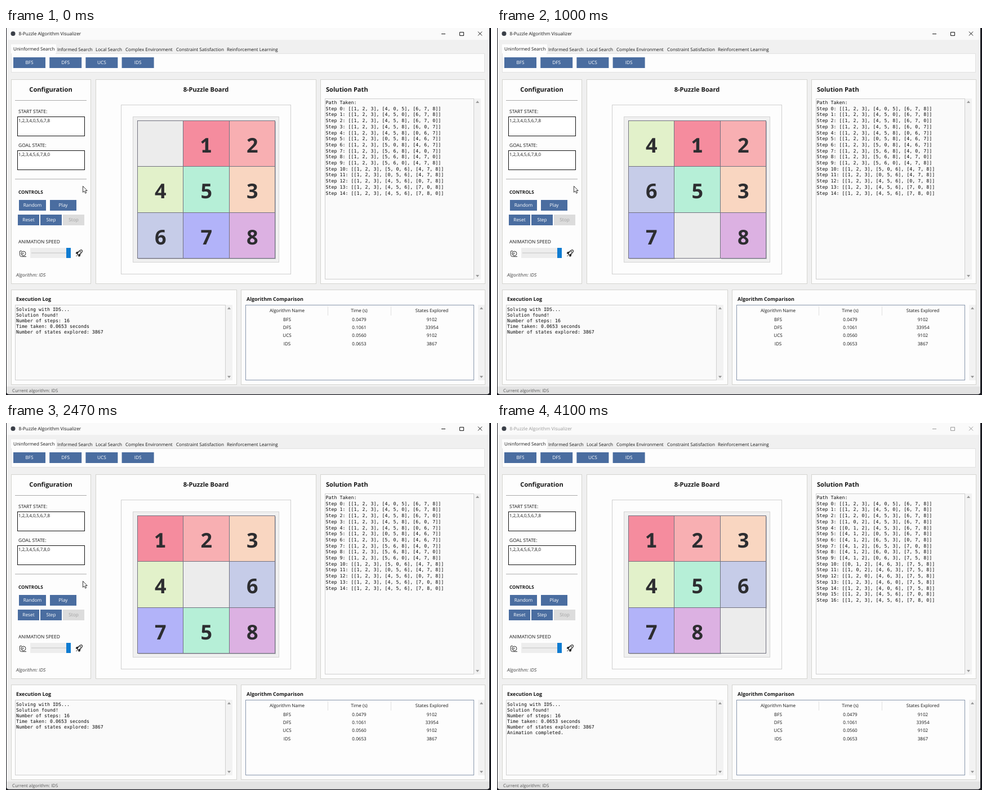
An HTML page for the animation above (4130 ms loop, 861 px wide and 651 px high).

```html
<!DOCTYPE html>
<html lang="en">
<head>
<meta charset="utf-8">
<title>8-Puzzle Algorithm Visualizer</title>
<style>
html, body { margin: 0; width: 100%; height: 100%; overflow: hidden; background: #1b1c22; }
svg { display: block; }
text { font-family: "Open Sans", "Noto Sans", sans-serif; text-rendering: geometricPrecision; }
.mono { font-family: "DejaVu Sans Mono", monospace; }
.b { font-weight: 700; }
.i { font-style: italic; }
</style>
</head>
<body>
<svg id="stage" width="861" height="651" viewBox="0 0 861 651"></svg>
<script>
const LOOP = 4130;
const START = [1, 2, 3, 4, 0, 5, 6, 7, 8];
const TILE = ['#ececec', '#f58c9e', '#f8afb2', '#f9d6c1', '#e2f1ca', '#b6efd7', '#c6cce8', '#b2b3f9', '#dcb1e2'];
const FIRST_STEP = 4;
const STEP_TIMES = [330, 610, 820, 1030, 1225, 1420, 1620, 1820, 2050, 2260, 2480, 2690];
const DONE = 2900, CURSOR_MOVE = 3360, CURSOR_GONE = 3900, BLUR = 3960;
const INK = '#161616', PAPER = '#fdfdfd', FIELD = '#fafafa';

// Rectangles are given by their corners, texts by their vertical middle.
const box = (x1, y1, x2, y2, fill, stroke = 'none') => {
  const o = stroke === 'none' ? 0 : .5;
  return `<rect x="${x1 + o}" y="${y1 + o}" width="${x2 - x1 - 2 * o}" height="${y2 - y1 - 2 * o}" fill="${fill}" stroke="${stroke}"/>`;
};
const text = (s, x, y, size = 8.1, fill = INK, cls = '', anchor = 'start') =>
  `<text x="${x}" y="${y + size * .357}" font-size="${size}" fill="${fill}" class="${cls}" text-anchor="${anchor}">${s}</text>`;
const mid = (s, x, y, size, fill, cls) => text(s, x, y, size, fill, cls, 'middle');
const path = (d, stroke = '#222', fill = 'none', w = 1) =>
  `<path d="${d}" stroke="${stroke}" fill="${fill}" stroke-width="${w}"/>`;
const mono = (lines, x, y, gap) =>
  lines.map((s, i) => text(s, x, y + i * gap, 8.305, '#0a0a0a', 'mono')).join('');
const button = (s, x1, y1, x2, y2, off) =>
  box(x1, y1, x2, y2, off ? '#dcdcdc' : '#4a6da0') +
  mid(s, (x1 + x2) / 2, (y1 + y2) / 2, 8.3, off ? '#a2a2a2' : '#fff');
const panel = (x1, y1, x2, y2) => box(x1, y1, x2, y2, PAPER, '#d4d4d0');
const scrollbar = (x, y1, y2) => box(x - 6, y1, x + 6, y2, '#f2f2f2') +
  path(`M${x - 3} ${y1 + 8}l3-4 3 4zM${x - 3} ${y2 - 8}l3 4 3-4z`, 'none', '#999');

// Follow the blank square from cell to cell.
function solve(cells) {
  const states = [START];
  for (let i = 1; i < cells.length; i++) {
    const s = [...states[i - 1]];
    s[cells[i - 1]] = s[cells[i]];
    s[cells[i]] = 0;
    states.push(s);
  }
  return states;
}
const row = (s, r) => `[${s.slice(r * 3, r * 3 + 3).join(', ')}]`;
const listing = states => mono(['Path Taken:', ...states.map((s, i) =>
  `Step ${i}: [${[0, 1, 2].map(r => row(s, r)).join(', ')}]`)], 567.5, 132, 10.71);

const oldPath = solve('458763478543678');
const states = solve('45210367430125478');

function board(state) {
  const at = i => Math.round(i * 81.4);
  let shadows = '', tiles = '';
  state.forEach((n, i) => {
    const c = i % 3, r = Math.floor(i / 3);
    const x1 = 233 + at(c), x2 = 234 + at(c + 1), y1 = 164 + at(r), y2 = 165 + at(r + 1);
    const cx = (x1 + x2) / 2 + .3, cy = y1 + 44;
    if (n) shadows += box(x1 + 2, y1 + 2, x2 + 1, y2 + 1, '#b9b9bf');
    tiles += box(x1, y1, x2, y2, TILE[n], '#71717f');
    if (n) tiles += mid(n, n === 1 ? cx - 1.2 : cx, cy, 36, '#2d2d30', 'b');
    if (n === 1) tiles += box(cx - 7, cy + 8.4, cx + 8, cy + 12.9, '#2d2d30');
  });
  return shadows + tiles;
}

const titleBar =
  '<circle cx="12.5" cy="10" r="4" fill="#3a3f48"/>' +
  `<g id="title">${text('8-Puzzle Algorithm Visualizer', 22.5, 10.5, 8.25, 'currentColor')}` +
  path('M773 10.5h7M805.5 7.5h7v6h-7zM838 6.5l7 7m0-7l-7 7', 'currentColor') + '</g>';

const tabs = box(9, 29, 89, 47, PAPER) + box(9, 45, 850, 79, PAPER, '#e2e2e2') +
  box(10, 44, 88, 47, PAPER) +
  text('Uninformed Search', 13, 37) +
  [['Informed Search', 91], ['Local Search', 159], ['Complex Environment', 212],
   ['Constraint Satisfaction', 302], ['Reinforcement Learning', 392]]
    .map(([s, x]) => text(s, x, 38.5)).join('') +
  ['BFS', 'DFS', 'UCS', 'IDS'].map((s, i) => button(s, 13 + i * 64.2, 52, 70 + i * 64.2, 71)).join('');

const snail = path('M24.500 395.500v7q0 3 3 3h8.500M25 395.500h3M31.500 400.500a1.300 1.300 0 1 0-1.500 1.200', '#333') +
  '<circle cx="31" cy="400" r="4" fill="none" stroke="#333"/>';
const rocket = '<ellipse cx="131" cy="398" rx="5.500" ry="2.500" transform="rotate(-45 131 398)" fill="#fff" stroke="#222" stroke-width="1.200"/>' +
  path('M129 397l-4 .5-1 2.500 3 .5zM132 400.500l-.5 4-2.500 1-.5-3z', '#222', '#222', .6) +
  path('M127 402.500l-2.500 2.500') + '<circle cx="132" cy="397" r="1" fill="#222"/>';

const config = panel(9, 91, 151, 454) + mid('Configuration', 79.5, 109, 11.1, INK, 'b') +
  path('M16 128.500h127M16 268h127', '#aaa') +
  text('START STATE:', 22, 148, 8.45) + box(20, 157, 140, 192, '#fff', '#111') +
  text('1,2,3,4,0,5,6,7,8', 22, 164.5, 7.9) +
  text('GOAL STATE:', 22, 208, 8.45) + box(20, 217, 140, 252, '#fff', '#111') +
  text('1,2,3,4,5,6,7,8,0', 22, 224.5, 7.9) +
  text('CONTROLS', 22, 291, 8.15, INK, 'b') +
  button('Random', 23, 305, 71, 324) + button('Play', 78, 305, 125, 324) +
  button('Reset', 21, 331, 59, 350) + button('Step', 61, 331, 99, 350) +
  button('Stop', 101, 331, 139, 350, true) +
  text('ANIMATION SPEED', 22, 379, 8.45) +
  box(43, 390, 115, 408, '#ededed') + box(45, 398, 107, 400, '#d8d8d8') +
  box(107, 390, 115, 408, '#0f7cd1') + snail + rocket +
  text('Algorithm: IDS', 18, 438.5, 8.4, '#444', 'i');

const boardPanel = panel(159, 91, 551, 454) + mid('8-Puzzle Board', 355, 109, 11.1, INK, 'b') +
  box(204, 136, 506, 437, PAPER, '#cfcfcf') + box(225, 157, 485, 416, '#f0f0f0', '#d3d3d3') +
  '<g id="board"></g>';

const pathPanel = panel(558, 91, 851, 454) + text('Solution Path', 568, 109, 11.1, INK, 'b') +
  box(566, 125, 831, 446, FIELD, '#cfcfcf') + scrollbar(837, 125, 446) +
  `<g id="oldPath">${listing(oldPath)}</g><g id="newPath">${listing(states)}</g>`;

const log = panel(9, 464, 410, 633) + text('Execution Log', 18, 481, 9, INK, 'b') +
  box(16, 491, 390, 625, FIELD, '#cfcfcf') + scrollbar(396, 491, 625) +
  mono(['Solving with IDS...', 'Solution found!', 'Number of steps: 16',
    'Time taken: 0.0653 seconds', 'Number of states explored: 3867'], 18, 499, 10) +
  `<g id="done">${mono(['Animation completed.'], 18, 549, 10)}</g>`;

const cells = (values, y) => [499, 627, 756].map((x, i) => mid(values[i], x, y)).join('');
const table = panel(417, 464, 851, 633) + text('Algorithm Comparison', 427, 481, 8.95, INK, 'b') +
  box(425, 491, 831, 625, PAPER, '#8796ac') + scrollbar(844, 491, 625) +
  path('M571.500 493v17M683.500 493v17', '#e0e0e0') +
  cells(['Algorithm Name', 'Time (s)', 'States Explored'], 501) +
  [['BFS', '0.0479', 9102], ['DFS', '0.1061', 33954], ['UCS', '0.0560', 9102], ['IDS', '0.0653', 3867]]
    .map((r, i) => cells(r, 517 + i * 14.25)).join('');

const status = path('M1 636H858V645q0 4.500-4.500 4.500H5.500q-4.500 0-4.500-4.500z', 'none', '#e3e3e3') +
  text('Current algorithm: IDS', 11, 643.5, 7.8, '#555');

const stage = document.getElementById('stage');
stage.innerHTML =
  path('M1 0H858V645q0 4.500-4.500 4.500H5.500q-4.500 0-4.500-4.500z', 'none', '#f0f0f0') +
  box(1, 0, 858, 21, '#fafafa') + titleBar + tabs + config + boardPanel + pathPanel + log + table + status +
  `<g id="cursor">${path('M.5.5v11l2.500-2.300 1.800 4 1.900-.9-1.800-3.800h3.300z', '#222', '#fff', .9)}</g>`;

const el = id => document.getElementById(id);
const show = (id, on) => el(id).setAttribute('visibility', on ? 'visible' : 'hidden');
let shown = -1;

function draw(t) {
  const step = FIRST_STEP + STEP_TIMES.filter(s => t >= s).length;
  if (step !== shown) el('board').innerHTML = board(states[shown = step]);
  show('oldPath', t < DONE);
  show('newPath', t >= DONE);
  show('done', t >= DONE);
  show('cursor', t < CURSOR_GONE);
  const k = Math.max(0, Math.min(1, (t - CURSOR_MOVE) / 100));
  el('cursor').setAttribute('transform', `translate(${136 + 24.5 * k} ${280 - 6.5 * k})`);
  el('title').style.color = t < BLUR ? INK : '#999';
}

const begin = performance.now();
function tick() {
  draw((performance.now() - begin) % LOOP);
  requestAnimationFrame(tick);
}
tick();
</script>
</body>
</html>
```
